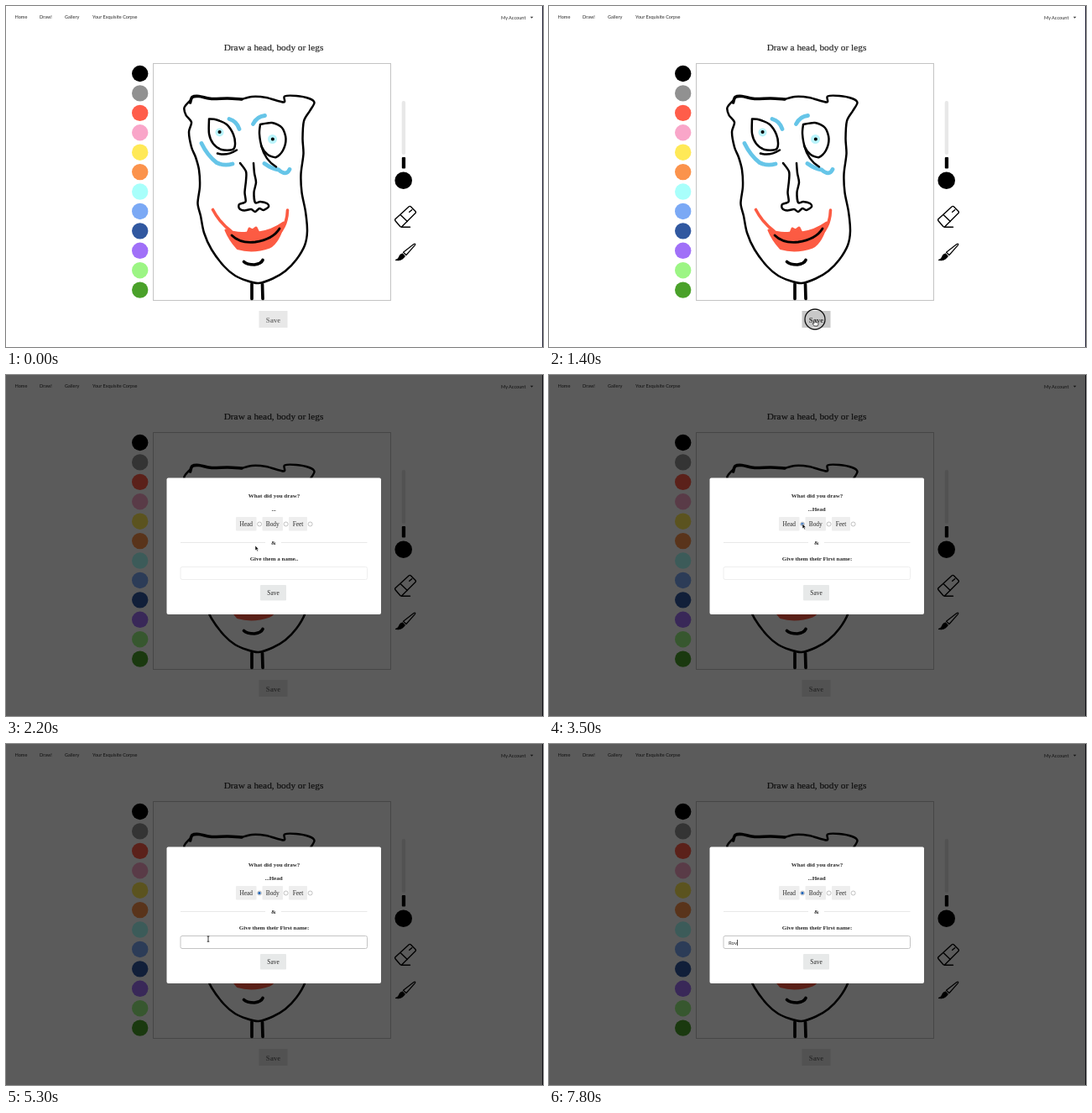
These frames come from a looping animation (640 by 406 pixels, 8 s). An HTML page:

```html
<!DOCTYPE html>
<html lang="en">
<head>
<meta charset="utf-8">
<title>Draw a head, body or legs</title>
<style>
html, body { margin: 0; width: 100%; height: 100%; overflow: hidden; background: #fff; }
svg { display: block; width: 640px; height: 406px; }
text { font-family: "Liberation Serif", serif; font-size: 7.4px; fill: #2a2a2a; text-anchor: middle; }
.nav { font: 5.6px Lato, sans-serif; text-anchor: start; }
.title { font-size: 11.3px; stroke: #2a2a2a; stroke-width: .2px; }
.bold { font-weight: bold; font-size: 7px; }
.line { fill: none; stroke: #000; stroke-linecap: round; stroke-linejoin: round; }
.button { fill: #eee; }
#radios circle { fill: #fff; stroke: #999; stroke-width: .6px; }
#typed { font: 6px Lato, sans-serif; text-anchor: start; }
</style>
</head>
<body>
<svg viewBox="0 0 640 406">
  <rect width="640" height="406" fill="#fff"/>
  <text class="nav" x="10.5" y="15">Home</text>
  <text class="nav" x="40" y="15">Draw!</text>
  <text class="nav" x="70" y="15">Gallery</text>
  <text class="nav" x="103" y="15">Your Exquisite Corpse</text>
  <text class="nav" x="590" y="15.5">My Account</text>
  <path d="M624.8 12.8h3.6l-1.8 2z" fill="#333"/>
  <text class="title" x="319" y="53.3">Draw a head, body or legs</text>
  <rect x="175.5" y="68.5" width="283" height="282" fill="#fff" stroke="#c4c4c4"/>
  <rect x="471.7" y="113" width="4.4" height="64" rx="2" fill="#e8e8e8"/>
  <rect id="saveButton" x="301.5" y="363" width="34" height="20"/>
  <text id="saveText" class="bold" x="318.5" y="376.6" style="font-size:8.7px">Save</text>
  <rect x="639" width="1" height="406" fill="#26263a"/>

  <g id="palette"></g>
  <rect x="471.8" y="180" width="4.3" height="13.5" rx="1"/>
  <circle cx="473.7" cy="207.7" r="10.3"/>
  <g class="line" stroke-width="1.4">
    <path d="M464.200 253.500L480.300 238.800Q481.300 238 482.300 238.800L488 244.500Q488.800 245.500 488 246.500L472 262.500Q471 263.500 469.800 262.500L464.200 256Q463 254.700 464.200 253.500ZM470 248.500L478.300 256.500M480.700 245.300l3-2.600M471 263.300H481.500"/>
    <path stroke-width="1.200" d="M473.500 293.300L486 283.500Q488.500 282.200 487.500 284.700L477 296.500Z"/>
    <path stroke-width=".8" d="M472.500 294.800Q469 295.500 468.300 299Q467 302 464 302.500Q471.500 304.300 475.500 298Z" fill="#000"/>
  </g>

  <g class="line">
    <g fill="#b9f4fb" stroke="none"><circle cx="254.500" cy="150.500" r="5"/><circle cx="317.500" cy="158.500" r="5.500"/></g>
    <path stroke="#66c5e8" stroke-width="4.800" d="M266 134.500Q275 137 278 146.500M294.500 140.500Q299 131.500 308.500 130.500M233 163.500Q240 178 251 186.500Q260 191 270 188M308 187.500Q317 194 325 195Q334 203 338 194.500"/>
    <path stroke="#fc5b43" stroke-width="3.600" d="M246.500 242.500Q254 257 268 268M335.500 243Q335 260 326 270"/>
    <path stroke="#fc5b43" fill="#fc5b43" stroke-width="3" d="M262 267Q276 272 288 270L290 265L294 267L298 264L301 270Q317 268 331 258Q325 281 314 287Q294 294 276 288.500Q267 279 262 267Z"/>
  </g>
  <g class="line" stroke-width="2.500">
    <path data-through="281 111 293 108 310 109 331 114.500 332 107.500 346 107 361 110 367.500 115 362 125 355 137 353.500 158 354.500 176 351.500 200 352.500 222 357 245 359 268 356 285 346 302 333 315.500 318 324.500 301 330 287 327 273 321 260 310 245 290 236 270 232 250 228.500 235 231 215 230 195 226 180 221 168 218 150 221 138.500 214.500 130 212.500 121 219 113"/>
    <path stroke-width="3.600" data-through="219.500 115 222 108.500 230 107.500 245 110.500 264 110 281 111"/>
    <path data-through="242 134.500 251 135.500 263 141 271 153 273 165 270 171 257 171 247 164 242 152 242 134.500"/>
    <path data-through="303 141 317 139 329 145 333.500 158 330 172 322 180 312 177 305 168 302 152 303 141"/>
    <path d="M304 166Q309 184 322 191.500M252 175.500Q263 179 275 171.500"/>
    <path data-through="279 187 286 197 286 208 284.500 222 285.500 233 278 236 278 241 284 243.500 292 242 297 245 302 241 307 243 313 239 311 235 303 233 297 234 295.500 222 298 210 296 199 295 187"/>
    <path stroke-width="2.800" d="M269 273Q279 283 297 281Q318 278 326 265"/>
    <path stroke-width="3.700" d="M283.500 304.500Q287 308 296 308Q304 307 306 302.500M293 331V348.500M305.500 331L306 348.500"/>
    <path stroke-width="4" d="M254.500 150h.1M317.800 158.500h.1"/>
  </g>

  <rect id="shade" width="640" height="406" opacity=".645"/>

  <g id="modal">
    <rect x="191.500" y="122.500" width="255.500" height="162.500" rx="2" fill="#fff"/>
    <text class="bold" x="319.500" y="146.300">What did you draw?</text>
    <text class="bold" id="choice" x="319" y="161.500"></text>
    <g id="radios"></g>
    <circle id="dot" cx="302" cy="177.500" r="1.700" fill="#2868b8"/>
    <path d="M208 199.500H309M328 199.500H430.500" stroke="#e8e8e8"/>
    <text class="bold" x="319" y="201.700">&amp;</text>
    <text class="bold" id="label" x="319.500" y="221.300"></text>
    <rect id="field" x="208" y="228.500" width="222.500" height="15" rx="2" fill="#fff"/>
    <text id="typed" x="214" y="238.800"></text>
    <rect id="caret" y="233" width=".7" height="7"/>
    <rect class="button" x="303" y="250" width="31" height="18.500" rx="1" style="fill:#e7e9e9"/>
    <text x="318.500" y="262.300">Save</text>
  </g>

  <circle id="ring" cx="317" cy="373" r="12" fill="none" stroke="#111" stroke-width="1.300"/>
  <g id="pointer" stroke-linejoin="round">
    <path id="arrow" d="M0 0V6L1.400 4.800L2.400 7L3.500 6.500L2.500 4.400H4.200Z" stroke="#fff" stroke-width=".6"/>
    <path id="hand" d="M-1 0Q0-1 .6 0V2.500L3.500 3.200Q4.300 3.500 4 4.800L3 7H-.8L-3 4Q-2.500 3-1 4Z" fill="#fff" stroke="#111" stroke-width=".7"/>
    <path id="beam" d="M-1.300-3H1.300M0-3V3.200M-1.300 3.200H1.300" fill="none" stroke="#222" stroke-width=".9"/>
  </g>
</svg>
<script>
const $ = id => document.getElementById(id);
const show = (id, on) => $(id).style.display = on ? '' : 'none';

// Smooth pen stroke through a list of points
function strokeThrough(list) {
  const n = list.split(' ').map(Number), p = [];
  for (let i = 0; i < n.length; i += 2) p.push([n[i], n[i + 1]]);
  const at = i => p[Math.min(p.length - 1, Math.max(0, i))];
  const lean = (i, k) => [0, 1].map(a => at(i)[a] + k * (at(i + 1)[a] - at(i - 1)[a]) / 7);
  return 'M' + p[0] + p.slice(1).map((q, i) => `C${lean(i, 1)} ${lean(i + 1, -1)} ${q}`).join('');
}
document.querySelectorAll('[data-through]').forEach(path =>
  path.setAttribute('d', strokeThrough(path.dataset.through)));

const inks = ['#000', '#919191', '#ff5d4a', '#f9a6c9', '#ffe957', '#fb934c',
  '#a8fffb', '#7ba9f5', '#3158a0', '#a070f8', '#9cf584', '#4aa12a'];
$('palette').innerHTML = inks.map((ink, i) =>
  `<circle cx="159.700" cy="${80.5 + 23.42 * i}" r="9.700" fill="${ink}"/>`).join('');

$('radios').innerHTML = [['Head', 274, 24.5], ['Body', 305.5, 24.5], ['Feet', 337, 22]].map(([name, x, w]) =>
  `<rect class="button" x="${x}" y="169" width="${w}" height="16.500" rx="1"/>
   <text x="${x + w / 2}" y="180">${name}</text>
   <circle cx="${x + w + 3.6}" cy="177.500" r="2.500"/>`).join('');

// Pointer stops: time, x, y
const stops = [[100, 636, 394], [900, 317, 374], [1800, 317, 374], [2200, 297, 203],
  [2500, 297, 203], [2900, 302, 177], [3500, 302, 177], [4300, 241, 232], [8000, 241, 232]];
const keys = [[6100, 'R'], [7500, 'Ro'], [7700, 'Rov']];
const FOCUS = 4700, OPEN = 1500, PICK = 2900;

function pointerAt(t) {
  const i = Math.max(1, stops.findIndex(s => s[0] >= t));
  const [t0, x0, y0] = stops[i - 1], [t1, x1, y1] = stops[i];
  const u = Math.max(0, (t - t0) / (t1 - t0)), e = u * u * (3 - 2 * u);
  return [x0 + (x1 - x0) * e, y0 + (y1 - y0) * e];
}

function draw(t) {
  const open = t >= OPEN, picked = t >= PICK, focused = t >= FOCUS;
  show('shade', open);
  show('modal', open);

  const hover = t >= 900 && t < 1900;
  $('saveButton').setAttribute('fill', hover ? '#c8c8c8' : '#e8e8e8');
  $('saveText').style.fill = hover ? '#333' : '#777';
  show('ring', t >= 1300 && t < OPEN);

  $('choice').textContent = picked ? '...Head' : '...';
  $('label').textContent = picked ? 'Give them their First name:' : 'Give them a name..';
  show('dot', picked);
  $('field').setAttribute('stroke', focused ? '#c4c4c4' : '#eee');

  const key = keys.filter(k => t >= k[0]).pop() || [FOCUS, ''];
  $('typed').textContent = key[1];
  show('caret', focused && (t - key[0]) % 1000 < 500);
  $('caret').setAttribute('x', 214.3 + (key[1] ? $('typed').getComputedTextLength() : 0));

  const [x, y] = pointerAt(t);
  const beam = open && t > 2500 && y > 228;
  show('pointer', t >= 100 && t < keys[0][0]);
  show('hand', hover);
  show('beam', beam);
  show('arrow', !hover && !beam);
  $('pointer').setAttribute('transform', `translate(${x} ${y})`);
}

function tick() {
  draw(Math.floor(performance.now() % 8000 / 100) * 100);
  requestAnimationFrame(tick);
}
tick();
</script>
</body>
</html>
```
